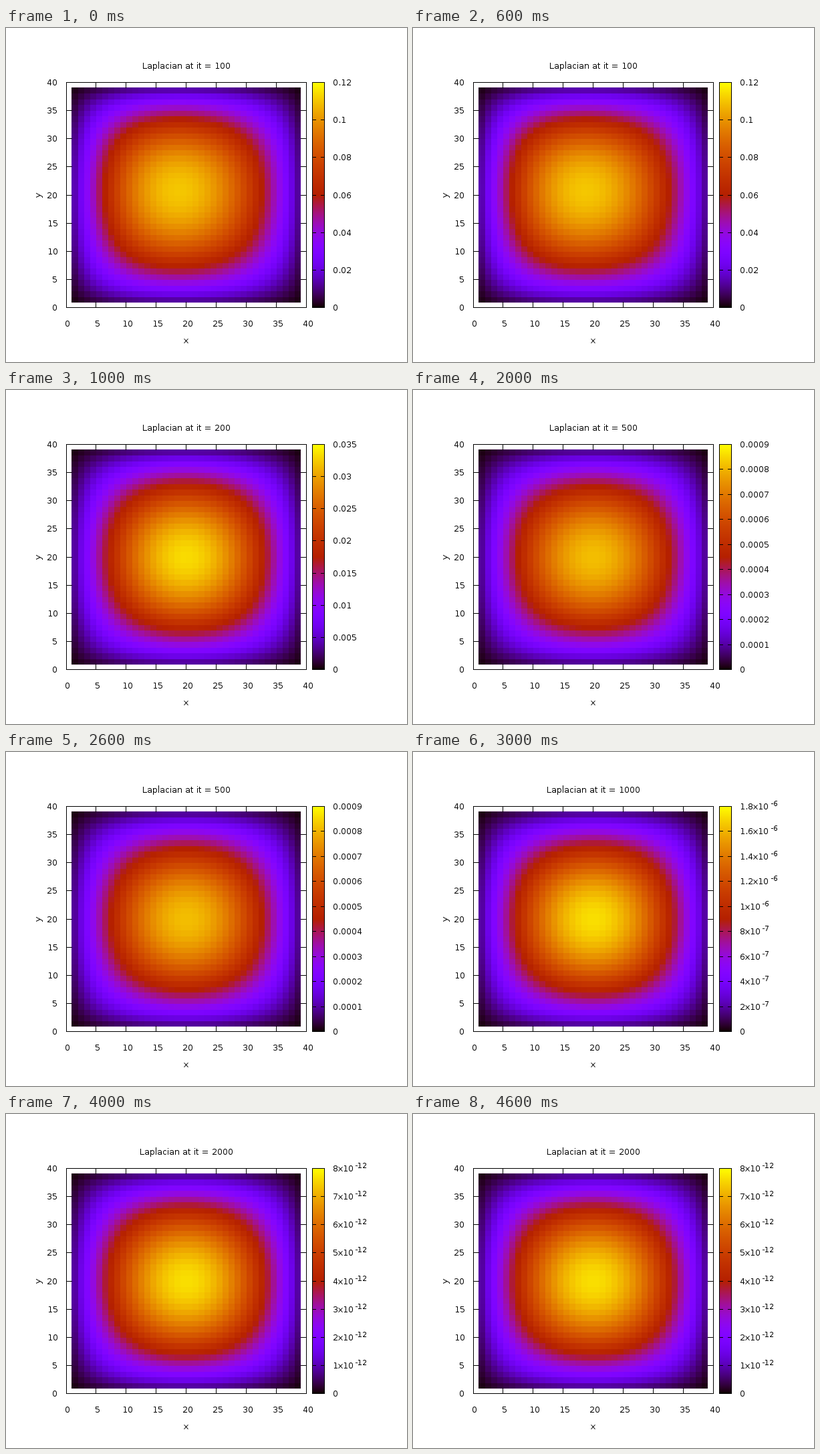
Write a matplotlib script that moves like this. It is 600 px wide and 500 px high and loops after 5 s.

```python
import matplotlib.pyplot as plt
import numpy as np
from matplotlib.animation import FuncAnimation
from matplotlib.patches import Rectangle

W, H, DPI = 600, 500, 96
LEFT, RIGHT, TOP, BOTTOM = 90, 449, 81, 418
BAR_L, BAR_R = 458, 476
N = 40
FONT = 10
EM = FONT * DPI / 72

plt.rcParams.update({
    "font.family": "DejaVu Sans",
    "text.hinting": "native",
    "text.hinting_factor": 1,
})

# iteration, colour range, tick step, power of ten, decimals,
# peak relative to the range, skew along x and y, flatness
STEPS = [
    (100, 0.12, 0.02, None, 2, 0.920, 0.042, -0.025, 0.02),
    (200, 0.035, 0.005, None, 3, 0.950, 0.002, -0.001, 0),
    (500, 0.0009, 0.0001, None, 4, 0.905, 0, 0, 0),
    (1000, 18, 2, -7, 0, 0.955, 0, 0, 0),
    (2000, 8, 1, -12, 0, 0.955, 0, 0, 0),
]


def palette(v):
    v = np.clip(v, 0, 1)
    blue = np.clip(np.sin(2 * np.pi * v), 0, 1)
    return np.stack([np.sqrt(v), v**3, blue], axis=-1)


def field(peak, skew_x, skew_y, flat):
    """Lowest modes of the square, averaged over each cell."""
    t = np.pi * np.arange(1, N) / N
    gx = np.sin(t) + skew_x * np.sin(2 * t) + flat * np.sin(3 * t)
    gy = np.sin(t) + skew_y * np.sin(2 * t) + flat * np.sin(3 * t)
    u = np.outer(gy, gx)
    u = (u[1:, 1:] + u[:-1, 1:] + u[1:, :-1] + u[:-1, :-1]) / 4
    return peak * u / u.max()


def px(v):
    return LEFT + np.floor((RIGHT - LEFT + 0.98) * v / N)


def py(v):
    return BOTTOM - np.floor((BOTTOM - TOP + 0.9) * v / N)


def line(x0, y0, x1, y1):
    """One pixel wide line, both end pixels included."""
    return ax.add_patch(Rectangle((x0, y0), x1 - x0 + 1, y1 - y0 + 1,
                                  color="black", lw=0, antialiased=False,
                                  zorder=3))


def box(x0, x1):
    for y in (TOP, BOTTOM):
        line(x0, y, x1, y)
    for x in (x0, x1):
        line(x, TOP, x, BOTTOM)


def label(x, y, s, ha="center", size=FONT):
    return ax.text(x, y, s, ha=ha, va="baseline", fontsize=size)


def tick_text(value, power, decimals):
    """Return mantissa text and exponent text."""
    if value == 0:
        return "0", ""
    if power is None:
        return f"{value:.{decimals}f}".rstrip("0"), ""
    if value >= 10:
        value, power = value / 10, power + 1
    return f"{value:g}x10", str(power)


fig = plt.figure(figsize=(W / DPI, H / DPI), dpi=DPI, facecolor="white")
ax = fig.add_axes([0, 0, 1, 1])
ax.set_xlim(0, W)
ax.set_ylim(H, 0)
ax.axis("off")

# Neighbouring cells share a pixel, kept by the left and the upper one.
nodes = np.arange(1, N)
cols, rows = px(nodes) + 1, py(nodes) + 1
cols[0] -= 1
rows[-1] -= 1
cells = ax.pcolormesh(cols, rows, palette(field(*STEPS[0][5:])),
                      antialiased=False, zorder=1)

levels = np.linspace(0, 1, BOTTOM - TOP + 1)
ax.pcolormesh([BAR_L, BAR_R + 1], np.arange(BOTTOM + 1, TOP - 1, -1),
              palette(levels)[:, None, :], antialiased=False, zorder=1)

box(LEFT, RIGHT)
box(BAR_L, BAR_R)
for v in range(0, N + 1, 5):
    x, y = px(v), py(v)
    label(LEFT + 9 * v + 2, 447, str(v))
    label(77.5, y + 5, str(v), ha="right")
    if 0 < v < N:
        line(x, TOP, x, TOP + 8)
        line(x, BOTTOM - 8, x, BOTTOM)
        line(LEFT, y, LEFT + 8, y)
        line(RIGHT - 8, y, RIGHT, y)

label(270, 472, "x")
ax.text(49.5, 249.5, "y", rotation=90, ha="center", va="center",
        fontsize=FONT)
title = label(270, 61, "")

bar_parts = []


def draw(i):
    it, top, step, power, decimals, *shape = STEPS[i]
    title.set_text(f"Laplacian at it = {it}")
    cells.set_array(palette(field(*shape)))

    while bar_parts:
        bar_parts.pop().remove()
    count = round(top / step)
    for k in range(count + 1):
        y = py(N * k / count)
        main, exponent = tick_text(k * step, power, decimals)
        bar_parts.append(label(489, y + 5, main, ha="left"))
        if exponent:
            ems = 1.864 + 0.636 * (len(main) - 3)
            if "." in main:
                ems -= 0.318
            bar_parts.append(label(489 + ems * EM, y, exponent,
                                   ha="left", size=0.8 * FONT))
        if 0 < k < count:
            bar_parts.append(line(BAR_L, y, BAR_L + 5, y))
            bar_parts.append(line(BAR_R - 5, y, BAR_R, y))
    return [title, cells, *bar_parts]


anim = FuncAnimation(fig, draw, frames=len(STEPS), init_func=lambda: [],
                     interval=1000, repeat=True, repeat_delay=0, blit=False)
plt.show()
```
